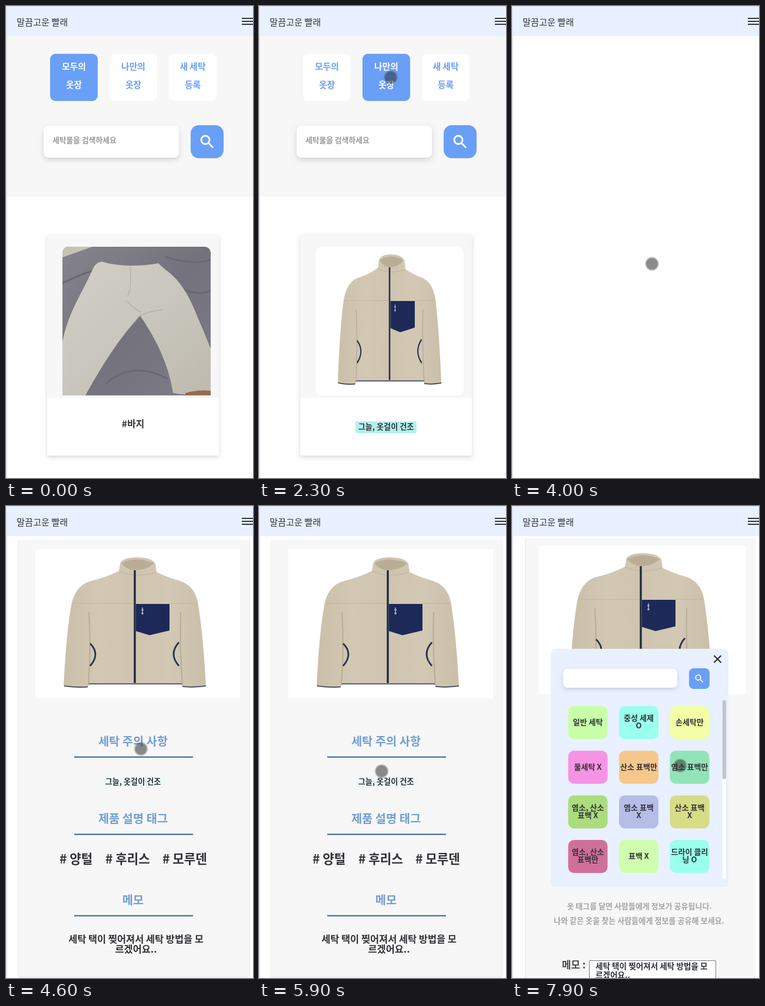
An HTML page with a canvas that plays this animation: 420 by 800 pixels, repeating every 8 s.

```html
<!DOCTYPE html>
<html lang="ko">
<head>
<meta charset="utf-8">
<style>
html, body { margin: 0; width: 100%; height: 100%; overflow: hidden; background: #fff; }
canvas { display: block; }
</style>
</head>
<body>
<canvas id="stage" width="420" height="800"></canvas>
<script>
const c = document.getElementById('stage').getContext('2d');
const LOOP = 8000, STEP = 100;
const BLUE = '#6a9ff7', PALE = '#e9f0ff', GREY = '#f7f7f7', INK = '#303236', NAVY = '#1d2a57';

function rect(x, y, w, h, fill, r = 0, shadow) {
  c.save();
  if (shadow) {
    c.shadowColor = 'rgba(0,0,0,.14)';
    c.shadowOffsetY = shadow;
    c.shadowBlur = shadow * 2.5;
  }
  c.fillStyle = fill;
  c.beginPath();
  c.roundRect(x, y, w, h, r);
  c.fill();
  c.restore();
}

// y is the optical middle of the line
function text(s, x, y, size, color = INK, weight = 700, align = 'center') {
  c.font = `${weight} ${size}px "Noto Sans CJK KR", "Noto Sans CJK", sans-serif`;
  c.fillStyle = color;
  c.textAlign = align;
  c.fillText(s, x, y + size * .37);
}

function stroke(d, color, width) {
  c.strokeStyle = color;
  c.lineWidth = width;
  c.stroke(new Path2D(d));
}

function shape(d, fill) {
  c.fillStyle = fill;
  c.fill(new Path2D(d));
}

function gradient(x0, y0, x1, y1, ...colors) {
  const g = c.createLinearGradient(x0, y0, x1, y1);
  colors.forEach((color, i) => g.addColorStop(i / (colors.length - 1), color));
  return g;
}

function searchButton(x, y, w, r) {
  rect(x, y, w, w, BLUE, r);
  c.save();
  c.translate(x + w / 2, y + w / 2);
  c.scale(w / 56, w / 56);
  stroke('M4-3A7 7 0 1 1-10-3A7 7 0 1 1 4-3M2 2L10 10', '#fff', 2.8);
  c.restore();
}

function header() {
  rect(0, 0, 420, 51, PALE);
  rect(0, 0, 420, 1, '#dcdfe8');
  rect(0, 0, 2, 800, '#e6e7ed');
  text('말끔고운 빨래', 18, 27, 15.2, '#30333a', 400, 'left');
  for (const y of [20, 25, 30]) rect(401, y, 19, 2, '#34373d');
}

function trousers() {
  c.save();
  c.beginPath();
  c.roundRect(96, 408, 252, 252, [10, 10, 0, 0]);
  c.clip();
  rect(96, 408, 252, 252, gradient(96, 408, 348, 660, '#85848c', '#74737d', '#7d7c86'));
  shape('M96 408H147L96 426Z', '#c6c3b6');
  stroke('M96 470Q125 455 150 448M270 425Q315 440 348 430M300 480Q330 492 348 482M170 640Q215 600 275 632', '#696873', 3);
  shape('M162 433Q185 440 211 440Q240 440 259 436Q267 444 279 453C303 474 315 500 326 528Q338 555 348 581V652Q312 662 284 656C279 621 263 575 228 525C194 561 165 606 135 660H96V570C105 520 130 486 147 447Q151 436 162 433Z',
    gradient(130, 440, 310, 660, '#d0cdc4', '#c9c6bd', '#bfbbb0'));
  stroke('M211 440Q214 480 207 491M228 525Q240 518 265 515M230 519Q215 512 206 500', '#b4b1a8', 1.5);
  shape('M305 656Q325 650 348 652V660H305Z', '#9a6a4c');
  c.restore();
}

function jacket(x, y, sx) {
  c.save();
  c.translate(x, y);
  c.scale(sx, 1);
  c.translate(-98, -87);
  const wool = gradient(98, 0, 340, 0, '#cabfa9', '#d2c8b4', '#cec4b0', '#d2c8b4', '#cabfa9');
  shape('M194 98Q196 88 220 87Q249 87 254 98L256 112Q277 122 296 127Q320 135 326 162Q335 215 340 305Q320 310 300 306L298 301H141L139 307Q118 309 98 305Q102 220 111 168Q117 137 141 128Q171 121 192 110Z', wool);
  shape('M196 97Q220 84 252 97Q240 108 220 109Q205 108 196 97Z', '#b9ad96');
  stroke('M141 180Q145 240 140 304M297 180Q295 240 300 304', '#b8ac95', 2);
  stroke('M114 165H219M278 165H325M192 110Q205 116 218 117M256 112Q240 117 222 117', '#bfb49d', 1.2);
  shape('M221 166H278V211L244 219L221 212Z', NAVY);
  stroke('M219 109V300', '#252e45', 3.5);
  stroke('M141 301.5H299M99 305Q118 308 139 306.5M300 306Q320 308 340 305', '#2c3450', 1.6);
  stroke('M143 233Q161 251 143 271M294 231Q276 251 294 271', '#29324f', 2.8);
  stroke('M232 172V184M230 176H234M230 182H234', '#b8bac4', 1.5);
  c.restore();
}

function wardrobe(active) {
  rect(2, 51, 418, 272, GREY);
  const tabs = [['모두의', '옷장'], ['나만의', '옷장'], ['새 세탁', '등록']];
  tabs.forEach((lines, i) => {
    const x = 75 + i * 101, on = i === active;
    rect(x, 81, 81, 80, on ? BLUE : '#fff', 9);
    lines.forEach((s, j) => text(s, x + 40.5, 103 + j * 30.5, 14.8, on ? '#fff' : BLUE));
  });
  rect(64, 203, 230, 54, '#fff', 8, 4);
  text('세탁물을 검색하세요', 79, 227, 12.8, '#999', 700, 'left');
  searchButton(314, 202, 56, 14);

  rect(70, 388, 292, 374, '#fff', 2, 3);
  rect(70, 388, 292, 276, GREY);
  if (active) {
    rect(96, 408, 252, 252, '#fff', 10);
    jacket(134, 421, 176 / 242);
    rect(164, 704, 104, 20, '#b2f1ee', 4);
    text('그늘, 옷걸이 건조', 216, 713, 13.1);
  } else {
    trousers();
    text('#바지', 216, 708, 15.8);
  }
}

function detail() {
  rect(21, 58, 392, 740, GREY, 0, 1);
  rect(50, 73, 348, 253, '#fff');
  jacket(98, 87, 1);
  [['세탁 주의 사항', 399], ['제품 설명 태그', 530], ['메모', 668]].forEach(([s, y]) => {
    text(s, 216, y, 19.8, '#729ed3');
    rect(116, y + 25.5, 202, 2, '#315f8e');
  });
  rect(165, 458, 104, 20, '#eff8f9', 4);
  text('그늘, 옷걸이 건조', 216, 467, 13.1);
  [['# 양털', 91], ['# 후리스', 169], ['# 모루덴', 266]].forEach(([s, x]) => text(s, x, 598, 21.2, INK, 700, 'left'));
  text('세탁 택이 찢어져서 세탁 방법을 모', 221, 734, 16.4);
  text('르겠어요..', 221, 751, 16.4);
}

function editor() {
  rect(22, 55, 391, 745, GREY);
  rect(22, 55, 1, 745, '#e9e9ec');
  rect(412, 55, 1, 745, '#eeeeef');
  rect(45, 67, 353, 252, '#fff');
  jacket(98, 80, 1);
  text('세탁 주의 사항', 216, 381, 19.8, '#96b8ef');
  rect(149, 422, 106, 20, '#ccfba8', 3);
  text('그늘, 옷걸이 건조', 202.5, 432, 13.1);
  rect(265, 422, 19, 20, '#fddaa6', 3);
  text('+', 274.5, 430, 13);
  text('제품 설명 태그', 216, 533, 19.8, '#96b8ef');
  text('#양털', 174, 562, 19);
  text('#후리스', 249.5, 562, 19);
  text('#모루덴', 200, 612, 19);
  text('+', 258, 611, 19, INK, 500);
  text('옷 태그를 달면 사람들에게 정보가 공유됩니다.', 216.5, 678, 13, '#a5a5a7');
  text('나와 같은 옷을 찾는 사람들에게 정보를 공유해 보세요.', 216, 703, 13.1, '#a5a5a7');
  text('메모 :', 105, 778, 17, '#46484c');
  rect(131, 770, 216, 40, '#777b84', 2);
  rect(132, 771, 214, 40, '#fff', 1);
  text('세탁 택이 찢어져서 세탁 방법을 모', 142, 780, 13.6, INK, 700, 'left');
  text('르겠어요..', 142, 795, 13.6, INK, 700, 'left');
}

const tiles = [
  ['일반 세탁', '#c9ffa9'], ['중성 세제|O', '#9affec'], ['손세탁만', '#f2ffa6'],
  ['물세탁 X', '#f593e4'], ['산소 표백만', '#f6c78b'], ['염소 표백만', '#92e4b8'],
  ['염소, 산소|표백 X', '#abdc7d'], ['염소 표백|X', '#b5bde8'], ['산소 표백|X', '#d7dc86'],
  ['염소, 산소|표백만', '#d0709a'], ['표백 X', '#ceffae'], ['드라이 클리|닝 O', '#9affec']
];

function modal() {
  rect(66, 242, 302, 404, PALE, 7);
  stroke('M343.5 253.5L355.5 265.5M355.5 253.5L343.5 265.5', '#333', 2.4);
  rect(87, 276, 194, 32, '#fff', 7, 3);
  searchButton(301, 275, 35, 8);
  rect(358, 329, 6, 303, '#fff', 3);
  rect(358, 329, 6, 134, '#c2c3c6', 3);
  tiles.forEach(([label, color], i) => {
    const x = 95.5 + i % 3 * 86.5, y = 339 + Math.floor(i / 3) * 75.7;
    rect(x, y, 67, 56, color, 10);
    const lines = label.split('|');
    lines.forEach((s, j) => text(s, x + 33.5, y + 27 + (j - (lines.length - 1) / 2) * 13, 13));
  });
}

// pointer stops: time, x, y
const path = [
  [1000, 385, 30], [1200, 358, 89], [1900, 224, 121], [2400, 224, 121], [3000, 238, 437],
  [4300, 238, 437], [5200, 205, 339], [5500, 205, 339], [6300, 212, 560], [6500, 212, 560],
  [6800, 213, 538], [7200, 274, 432], [7500, 274, 432], [7900, 286, 440]
];

function pointer(t) {
  if (t < path[0][0]) return;
  const i = Math.max(1, path.findIndex(p => p[0] >= t));
  const [t0, x0, y0] = path[i - 1], [t1, x1, y1] = path[i];
  let k = (t - t0) / (t1 - t0);
  k = k * k * (3 - 2 * k);
  const x = x0 + (x1 - x0) * k, y = y0 + (y1 - y0) * k;
  const g = c.createRadialGradient(x, y, 9, x, y, 12.5);
  g.addColorStop(0, 'rgba(50,50,50,.56)');
  g.addColorStop(1, 'rgba(50,50,50,0)');
  c.fillStyle = g;
  c.fillRect(x - 13, y - 13, 26, 26);
}

function draw(now) {
  const t = Math.floor(now % LOOP / STEP) * STEP;
  rect(0, 0, 420, 800, '#fefefe');
  if (t < 2100) wardrobe(0);
  else if (t < 3400) wardrobe(1);
  else if (t >= 6500) editor();
  else if (t >= 4300) detail();
  if (t >= 7400) modal();
  header();
  pointer(t);
}

let start;
function tick(now) {
  start ??= now;
  draw(now - start);
  requestAnimationFrame(tick);
}
draw(0);
requestAnimationFrame(tick);
</script>
</body>
</html>
```
